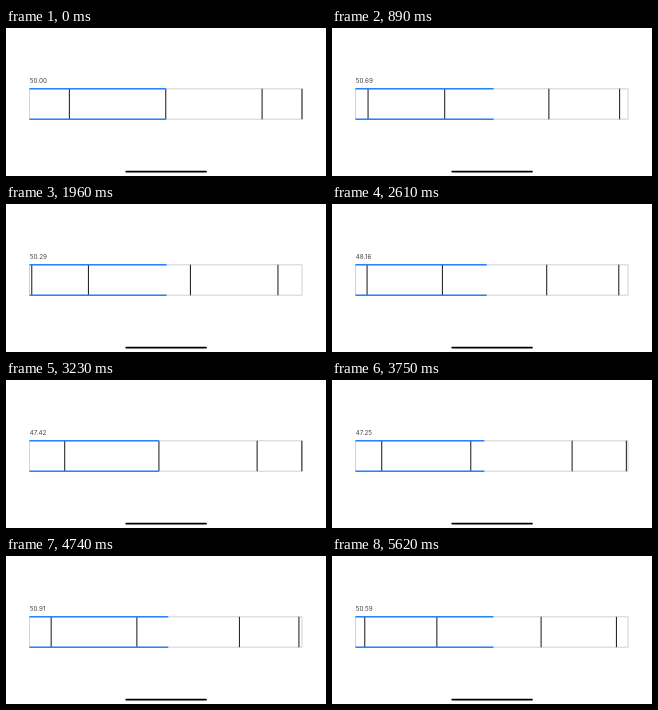
An HTML page with a canvas that plays this animation: 320 by 148 pixels, repeating every 5.67 s.

```html
<!DOCTYPE html>
<html lang="en">
<head>
<meta charset="utf-8">
<title>Wheel slider</title>
<style>
  html, body { margin: 0; width: 100%; height: 100%; overflow: hidden; background: #fff; }
  canvas { display: block; width: 320px; height: 148px; }
</style>
</head>
<body>
<canvas id="stage"></canvas>
<script>
const W = 320, H = 148, LOOP = 5670;
const REST = 770, STEP_START = 728, STEP = 107.8;
const LEFT = 23.5, RIGHT = 296, TOP = 60.8, BOTTOM = 91.2;
const DEG_PER_UNIT = 36, TICK_GAP = 45;
const BLUE = '#2583ff', GRAY = '#d2d2d2', INK = '#2a2a2a';

// The drag: up, down past the middle, up again and back, as [step, value].
const path = [
  [-1, 50], [5, 51.69], [6, 51.69], [11, 50.29], [18, 47.95], [23, 47.42],
  [27, 47.22], [32, 47.88], [37, 50.91], [41, 51.72], [45, 50.59]
];

const canvas = document.getElementById('stage');
const ctx = canvas.getContext('2d');
const scale = window.devicePixelRatio || 1;
canvas.width = W * scale;
canvas.height = H * scale;
ctx.scale(scale, scale);

const slope = i => (path[i + 1][1] - path[i][1]) / (path[i + 1][0] - path[i][0]);

// Harmonic mean of the neighbouring slopes keeps the curve free of overshoot.
function tangent(i) {
  if (i === 0 || i === path.length - 1) return slope(Math.max(0, i - 1));
  const a = slope(i - 1), b = slope(i);
  return a * b <= 0 ? 0 : 2 * a * b / (a + b);
}

function valueAt(step) {
  let i = 0;
  while (i < path.length - 2 && path[i + 1][0] <= step) i++;
  const [s0, v0] = path[i], [s1, v1] = path[i + 1];
  const span = s1 - s0, u = (step - s0) / span, w = 1 - u;
  return v0 * w * w * (1 + 2 * u) + v1 * u * u * (3 - 2 * u)
    + span * u * w * (tangent(i) * w - tangent(i + 1) * u);
}

function line(x0, y0, x1, y1, color, width, cap = 'butt') {
  ctx.strokeStyle = color;
  ctx.lineWidth = width;
  ctx.lineCap = cap;
  ctx.beginPath();
  ctx.moveTo(x0, y0);
  ctx.lineTo(x1, y1);
  ctx.stroke();
}

function draw(value) {
  ctx.fillStyle = '#fff';
  ctx.fillRect(0, 0, W, H);

  ctx.strokeStyle = GRAY;
  ctx.lineWidth = 1;
  ctx.strokeRect(LEFT, TOP, RIGHT - LEFT, BOTTOM - TOP);

  // Ticks sit on a turning cylinder seen from the side.
  const middle = (LEFT + RIGHT) / 2, radius = (RIGHT - LEFT) / 2;
  const turn = (value - 50) * DEG_PER_UNIT;
  const first = Math.floor((-90 - turn) / TICK_GAP) + 1;
  for (let k = first; k * TICK_GAP + turn <= 90; k++) {
    const x = middle + radius * Math.sin((k * TICK_GAP + turn) * Math.PI / 180);
    line(x, TOP, x, BOTTOM, INK, 1.1);
  }

  const end = LEFT + (RIGHT - LEFT) * value / 100;
  for (const y of [TOP, BOTTOM]) line(LEFT, y, end, y, BLUE, 1.5);

  ctx.fillStyle = '#444';
  ctx.font = '6.3px Inter, sans-serif';
  ctx.fillText(value.toFixed(2), 23.8, 54.9);

  line(120.2, 143.6, 200, 143.6, '#000', 1.8, 'round');
}

function frame(now) {
  const ms = now % LOOP;
  draw(ms < REST ? 50 : valueAt(Math.floor((ms - STEP_START) / STEP)));
  requestAnimationFrame(frame);
}
draw(50);
requestAnimationFrame(frame);
</script>
</body>
</html>
```
